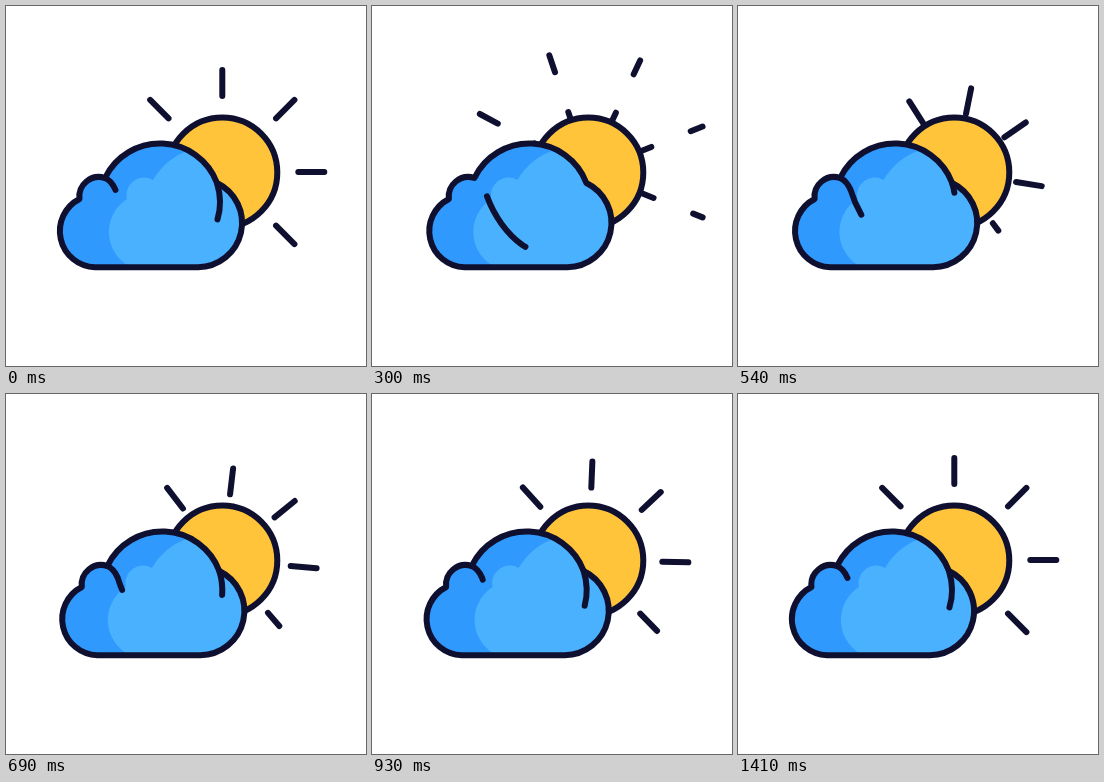
Recreate the animation shown at these times as an HTML page. Size 360 by 360 pixels, loop 1500 ms.

```html
<!DOCTYPE html>
<html lang="en">
<head>
<meta charset="utf-8">
<title>Partly cloudy</title>
<style>
  html, body { margin: 0; width: 100%; height: 100%; overflow: hidden; background: #fff; }
  svg { display: block; width: 100vw; height: 100vh; }
  .ink { stroke: #0f1030; stroke-width: 6; stroke-linecap: round; stroke-linejoin: round; }
</style>
</head>
<body>
<svg viewBox="0 0 360 360">
  <defs>
    <path id="shape" d="M89 261.200A36.100 36.100 0 0 1 73.500 193A19.500 19.500 0 0 1 99 172A61 61 0 0 1 211 177A44.300 44.300 0 0 1 192 261.200Z"/>
    <clipPath id="inside"><use href="#shape"/></clipPath>
  </defs>
  <g id="rays" class="ink"></g>
  <circle class="ink" cx="216.300" cy="166.500" r="55" fill="#ffc43a"/>
  <g id="cloud">
    <use href="#shape" fill="#3099fe"/>
    <g clip-path="url(#inside)">
      <path id="light" fill="#4ab1ff" d="M127 262A39 39 0 0 1 121 193A17.500 17.500 0 0 1 147 174Q160 152 184 144L260 140V270H127Z"/>
    </g>
    <use href="#shape" class="ink" fill="none"/>
    <g id="folds" class="ink" fill="none"></g>
  </g>
</svg>
<script>
  const LOOP = 1500, STEP = 30, LAST = 1410;
  const RAY_IN = 76, RAY_OUT = 102, RAY_MAX = 123;
  const FOLD = 'M211 177C215 190 215 203 211 215C205 233 186 264 147 239C130 227 116 206 109.500 184C107 178 104 174 99 172';
  const RIGHT = 37, LEFT = 16.5;

  const $ = id => document.getElementById(id);
  const clamp = v => Math.min(1, Math.max(0, v));
  const smooth = v => { v = clamp(v); return v * v * (3 - 2 * v); };

  function add(parent, tag, attrs = {}) {
    const el = document.createElementNS('http://www.w3.org/2000/svg', tag);
    for (const k in attrs) el.setAttribute(k, attrs[k]);
    return parent.appendChild(el);
  }

  // cubic-bezier(.14, 0, .08, 1)
  function ease(u) {
    u = clamp(u);
    let lo = 0, hi = 1;
    for (let i = 0; i < 24; i++) {
      const s = (lo + hi) / 2, r = 1 - s;
      if (3 * s * r * r * 0.14 + 3 * s * s * r * 0.08 + s * s * s < u) lo = s; else hi = s;
    }
    return smooth(lo);
  }

  function show(el, on) {
    el.setAttribute('visibility', on ? 'visible' : 'hidden');
  }

  function setRay(el, from, to) {
    show(el, to > from);
    el.setAttribute('y1', -from);
    el.setAttribute('y2', -to);
  }

  function setFold(el, from, to) {
    show(el, to > from);
    el.setAttribute('stroke-dasharray', Math.max(0, to - from) + ' 2000');
    el.setAttribute('stroke-dashoffset', -from);
  }

  // Each spoke carries one leaving and one arriving ray.
  const spokes = Array.from({ length: 6 }, (_, i) => {
    const g = add($('rays'), 'g');
    return {
      g, angle: 135 - 45 * i, start: 32 + 10 * i, span: 1140 + 52 * i,
      leaving: add(g, 'line'), arriving: add(g, 'line')
    };
  });
  const [slider, growing, fading] = [0, 1, 2].map(() => add($('folds'), 'path', { d: FOLD }));
  const length = slider.getTotalLength();

  function drawRays(t) {
    spokes.forEach(({ g, angle, start, span, leaving, arriving }, i) => {
      const p = ease((t - start) / span), rest = 1 - p;
      g.setAttribute('transform', `translate(216.300 166) rotate(${angle + 45 * rest})`);
      setRay(leaving, RAY_IN + 71 * p, i ? Math.min(RAY_MAX, RAY_OUT + 71 * p) : 0);
      setRay(arriving, RAY_IN - 66 * rest, RAY_OUT - (i ? 66 : 160) * rest);
    });
  }

  function drawCloud(t) {
    const sway = smooth(t / 250) * (1 - smooth((t - 420) / 720));
    $('cloud').setAttribute('transform', `translate(${3.4 * sway} 0)`);
    $('light').setAttribute('transform', `translate(${-5 * sway} 0)`);

    const travel = length - LEFT;
    const tail = travel * ease(t / 1095);
    const head = RIGHT + (length - RIGHT) * ease(t / 600);
    setFold(slider, tail, head);
    setFold(growing, 0, tail - travel + RIGHT);
    setFold(fading, travel + tail, length);
  }

  function frame() {
    const t = Math.min(LAST, Math.floor(performance.now() % LOOP / STEP) * STEP);
    drawRays(t);
    drawCloud(t);
    requestAnimationFrame(frame);
  }
  frame();
</script>
</body>
</html>
```
